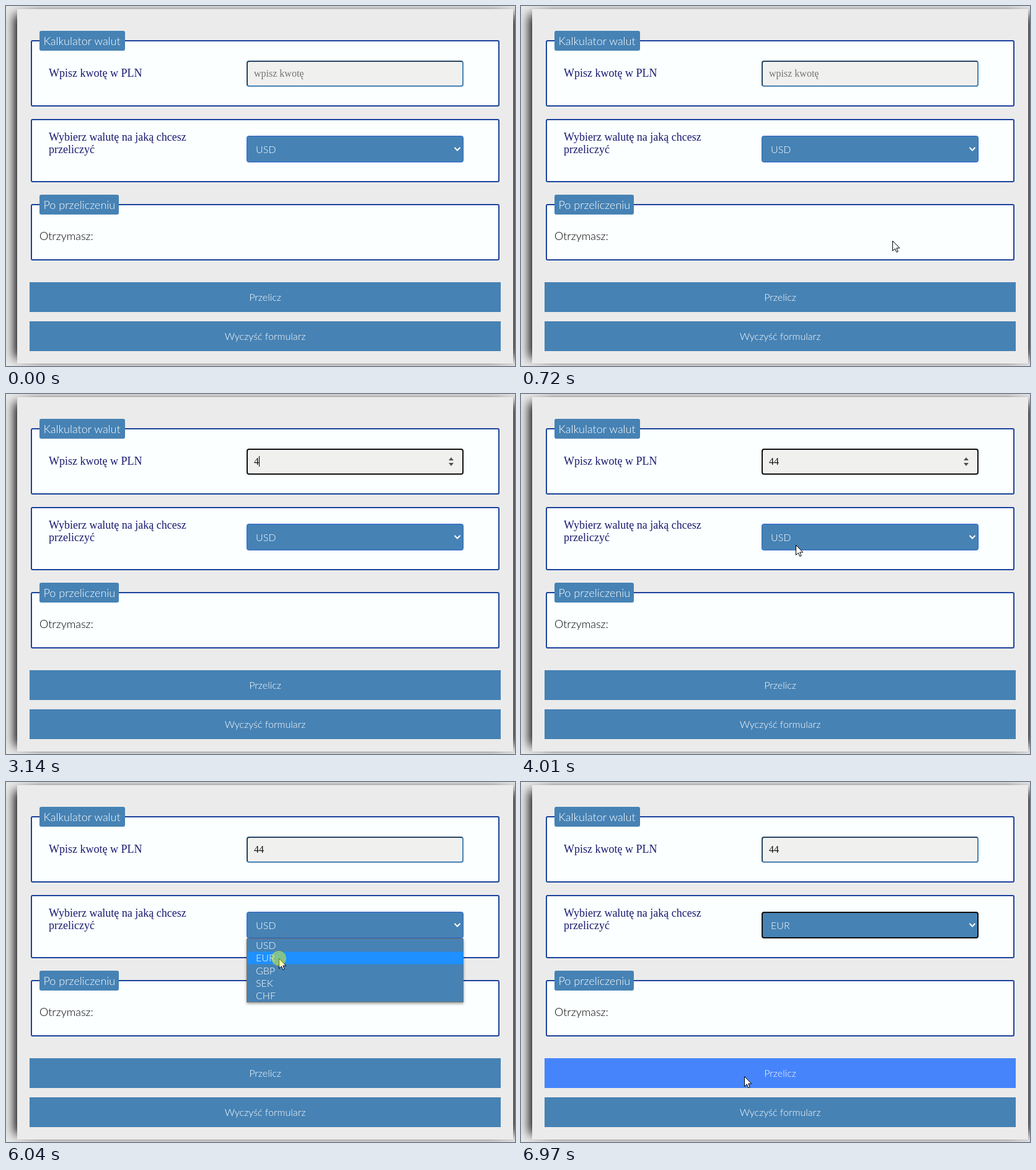
An HTML page for the animation above (8 s loop, 821x580 px).

```html
<!DOCTYPE html>
<html lang="pl">
<head>
<meta charset="utf-8">
<title>Kalkulator walut</title>
<style>
  html, body { margin: 0; width: 100%; height: 100%; overflow: hidden; background: #e8e8e8; }
  body { position: relative; }
  .card, .input, svg { position: absolute; box-sizing: border-box; }
  .card {
    left: 18px; top: 5px; width: 800px; height: 571px; background: #ebebeb;
    box-shadow: -13px 0 16px -9px #000, 13px 0 16px -9px #000;
  }
  svg { left: 0; top: 0; width: 821px; height: 580px; }
  .set { fill: #fbffff; stroke: #1b429c; stroke-width: 2; }
  .blue { fill: #4682b4; }
  .hot { fill: #4584fb; }
  .input {
    left: 388px; top: 88px; width: 350px; height: 42px;
    border: 2px inset #4682b4; border-radius: 4px; background: #f0f0ee;
  }
  .input.focus { border: 2px solid #101010; }
  .select { fill: #4682b4; stroke: #2a62cf; }
  .select.focus { stroke: #101010; stroke-width: 2; }
  .lato { font: 300 16px Lato, sans-serif; fill: #fff; }
  .big { font-size: 18px; }
  .dark { fill: #000; }
  .mid { text-anchor: middle; }
  .label { font: 18px "Liberation Serif", "Times New Roman", serif; fill: #191970; }
  .value { font: 16px "Liberation Serif", "Times New Roman", serif; fill: #111; }
  .hint { fill: #757575; }
  .menu { filter: drop-shadow(0 2px 2px rgba(0, 0, 0, .4)); }
</style>
</head>
<body>
<div class="card"></div>
<svg>
  <rect class="set" x="41" y="56" width="754" height="105" rx="2"/>
  <rect class="set" x="41" y="183" width="754" height="100" rx="2"/>
  <rect class="set" x="41" y="320" width="754" height="89" rx="2"/>
</svg>
<div class="input" id="input"></div>
<svg>
  <rect class="blue" x="54" y="40" width="138" height="32" rx="3"/>
  <text class="lato big" x="60.5" y="63">Kalkulator walut</text>
  <text class="label" x="69" y="114">Wpisz kwotę w PLN</text>
  <text class="value" id="value" x="400" y="114"></text>
  <rect id="caret" y="100" width="1" height="17"/>
  <path id="spin" fill="#505050" d="M714 107h8l-4-5zM714 111h8l-4 5z"/>

  <text class="label" x="69" y="217">Wybierz walutę na jaką chcesz</text>
  <text class="label" x="69" y="237">przeliczyć</text>
  <rect class="select" id="select"/>
  <text class="lato" id="chosen" x="403" y="237"></text>
  <path d="M723.5 228l4.5 4.5 4.5-4.5" fill="none" stroke="#fff" stroke-width="2"/>

  <rect class="blue" x="54" y="304" width="128" height="32" rx="3"/>
  <text class="lato big" x="60.5" y="327">Po przeliczeniu</text>
  <text class="lato big dark" x="54" y="377">Otrzymasz:</text>

  <rect class="blue" id="convert" x="38" y="445" width="760" height="48"/>
  <text class="lato mid" x="418" y="475">Przelicz</text>
  <rect class="blue" id="clear" x="38" y="508" width="760" height="48"/>
  <text class="lato mid" x="418" y="538">Wyczyść formularz</text>

  <g id="menu">
    <rect class="blue menu" x="388.5" y="252.5" width="349" height="102" stroke="#767676"/>
    <rect id="row" x="389" width="349" height="20" fill="#1e90ff"/>
    <g id="options"></g>
  </g>

  <g id="pointer">
    <path id="arrow" d="M.5 .5V16.5L4.3 13 6.8 18.6 9.2 17.5 6.7 12H11.8Z" fill="#fff" stroke="#000"/>
    <path id="beam" d="M-3 -7.5H-1L.5 -6.5 2 -7.5H4M.5 -6.5V7.5M-3 8.5H-1L.5 7.5 2 8.5H4" fill="none" stroke="#111"/>
    <circle id="click" r="12" fill="#ff0" fill-opacity=".45"/>
  </g>
</svg>
<script>
  const LOOP = 8000, STEP = 76;
  const $ = id => document.getElementById(id);
  const between = (v, a, b) => v >= a && v < b;
  const show = (id, on) => $(id).setAttribute("visibility", on ? "visible" : "hidden");
  const put = (id, attrs) => { for (const k in attrs) $(id).setAttribute(k, attrs[k]); };
  const setText = (id, s) => { if ($(id).textContent !== s) $(id).textContent = s; };

  const start = [671, 503];
  // start time, number of steps, end point
  const moves = [
    [505, 8, 445, 107],
    [3615, 6, 443, 243],
    [4710, 4, 441, 267],
    [5020, 3, 440, 284],
    [6580, 6, 360, 474]
  ];
  // from, to, caret x
  const carets = [[1040, 1580, 400], [2110, 2590, 400], [3140, 3370, 408], [3370, 3900, 416]];
  const clicks = [1040, 4080, 6040];

  ["USD", "EUR", "GBP", "SEK", "CHF"].forEach((name, i) => {
    const text = document.createElementNS("http://www.w3.org/2000/svg", "text");
    text.setAttribute("class", "lato");
    text.setAttribute("x", 403);
    text.setAttribute("y", Math.round(269 + i * 20.25));
    text.textContent = name;
    $("options").append(text);
  });

  function pointerAt(t) {
    let [x, y] = start;
    for (const [t0, n, toX, toY] of moves) {
      if (t < t0) break;
      const p = Math.min(1, (Math.floor((t - t0) / STEP) + 1) / n);
      const e = p * p * (3 - 2 * p);
      x += (toX - x) * e;
      y += (toY - y) * e;
    }
    return [Math.round(x), Math.round(y)];
  }

  function draw(t) {
    const [x, y] = pointerAt(t);
    const hot = y + 5;
    const seen = t >= 430 && !between(t, 2510, 3540);
    const overInput = t >= 430 && between(x, 388, 738) && between(hot, 88, 130);
    const typing = between(t, 1040, 4080);
    const open = between(t, 4160, 6120);
    const picked = t >= 6120;

    $("input").classList.toggle("focus", typing);
    show("spin", typing || overInput);
    setText("value", t < 3140 ? "wpisz kwotę" : t < 3370 ? "4" : "44");
    $("value").classList.toggle("hint", t < 3140);
    const caret = carets.find(c => between(t, c[0], c[1]));
    show("caret", caret);
    if (caret) put("caret", { x: caret[2] });

    const inset = picked ? 1 : .5;
    $("select").classList.toggle("focus", picked);
    put("select", { x: 388 + inset, y: 209 + inset, width: 350 - 2 * inset, height: 43 - 2 * inset, rx: 3 });
    setText("chosen", picked ? "EUR" : "USD");
    show("menu", open);
    put("row", { y: hot < 274 ? 253 : 273.5 });

    $("convert").classList.toggle("hot", t >= 430 && between(hot, 445, 493));
    $("clear").classList.toggle("hot", t >= 430 && between(hot, 508, 556));

    put("pointer", { transform: `translate(${x} ${y})` });
    show("arrow", seen && !overInput);
    show("beam", seen && overInput);
    show("click", clicks.some(c => between(t, c, c + 80)));
  }

  const t0 = performance.now();
  function frame() {
    draw((performance.now() - t0) % LOOP);
    requestAnimationFrame(frame);
  }
  frame();
</script>
</body>
</html>
```
